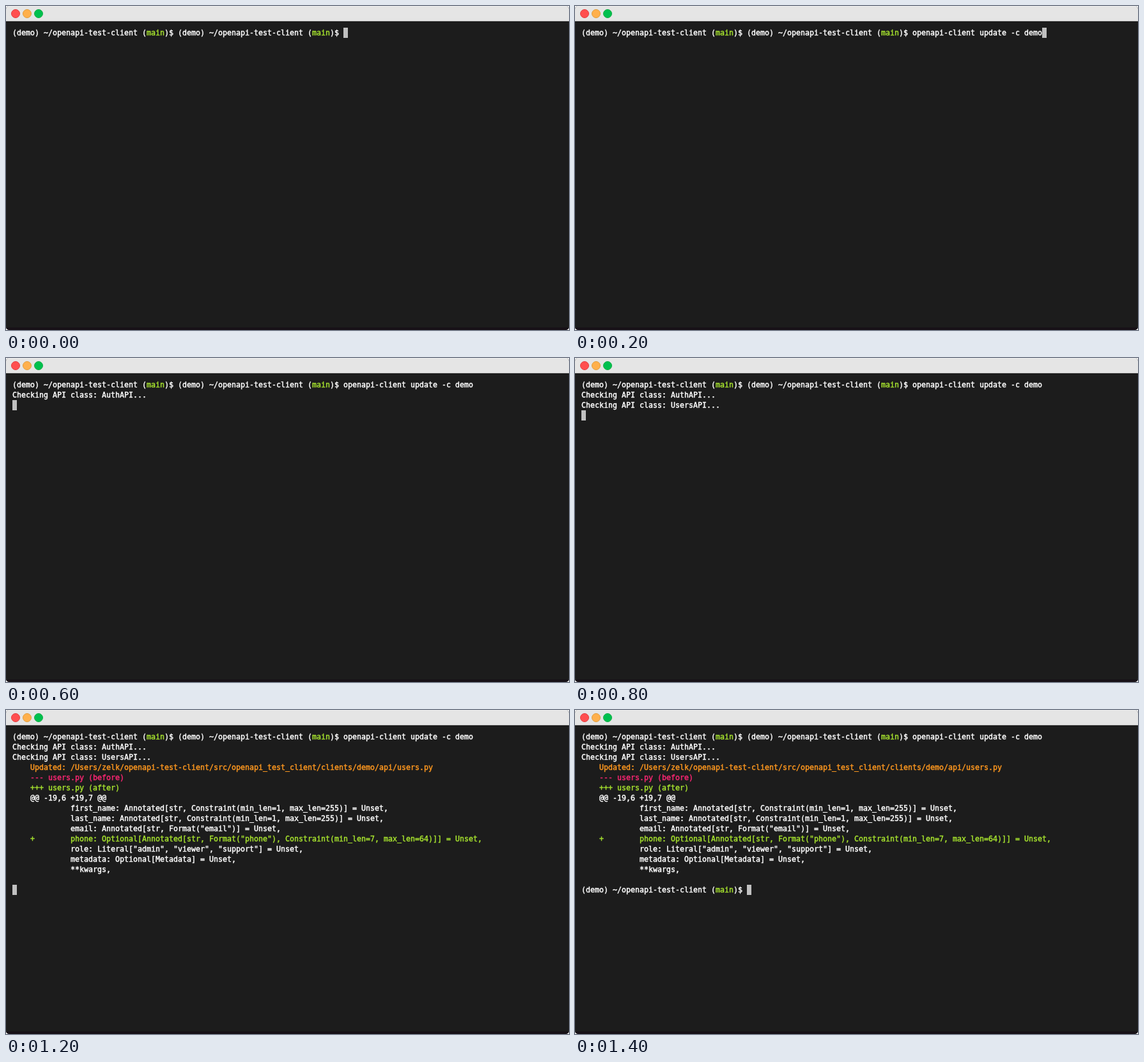
An HTML page with a canvas for the animation above (2000 ms loop, 881 px wide and 508 px high).

```html
<!DOCTYPE html>
<html lang="en">
<head>
<meta charset="utf-8">
<title>Terminal</title>
<style>
  html, body { margin: 0; width: 100%; height: 100%; overflow: hidden; background: #fff; }
  canvas { display: block; }
</style>
</head>
<body>
<canvas id="stage" width="881" height="508"></canvas>
<script>
const ctx = document.getElementById('stage').getContext('2d');
const W = 881, H = 508, LOOP = 2000, STEP = 200;
const LEFT = 10, TOP = 34, COL = 7, ROW = 16;
const WHITE = '#ffffff', GREEN = '#a6e22e', ORANGE = '#fd971f', PINK = '#f92672';

// A line is a list of [text, colour] runs.
const prompt = [['(demo) ~/openapi-test-client (', WHITE], ['main', GREEN], [')$ ', WHITE]];
const line = (text, color = WHITE) => [[text, color]];
const pad = ' '.repeat(4), deep = ' '.repeat(13);

const start = [...prompt, ...prompt];
const lines = [
  [...start, ['openapi-client update -c demo', WHITE]],
  line('Checking API class: AuthAPI...'),
  line('Checking API class: UsersAPI...'),
  line(pad + 'Updated: /Users/zelk/openapi-test-client/src/openapi_test_client/clients/demo/api/users.py', ORANGE),
  line(pad + '--- users.py (before)', PINK),
  line(pad + '+++ users.py (after)', GREEN),
  line(pad + '@@ -19,6 +19,7 @@'),
  line(deep + 'first_name: Annotated[str, Constraint(min_len=1, max_len=255)] = Unset,'),
  line(deep + 'last_name: Annotated[str, Constraint(min_len=1, max_len=255)] = Unset,'),
  line(deep + 'email: Annotated[str, Format("email")] = Unset,'),
  line(pad + '+        phone: Optional[Annotated[str, Format("phone"), Constraint(min_len=7, max_len=64)]] = Unset,', GREEN),
  line(deep + 'role: Literal["admin", "viewer", "support"] = Unset,'),
  line(deep + 'metadata: Optional[Metadata] = Unset,'),
  line(deep + '**kwargs,'),
  line('')
];

// Each screen ends with the line that holds the cursor.
const upTo = n => [...lines.slice(0, n), line('')];
const screens = [
  [start],
  [lines[0]],
  upTo(1),
  upTo(2),
  upTo(3),
  upTo(14),
  upTo(15),
  [...lines, prompt]
];

function drawWindow() {
  ctx.fillStyle = '#fff';
  ctx.fillRect(0, 0, W, H);
  ctx.save();
  ctx.beginPath();
  ctx.roundRect(0, 0, W, H, 5);
  ctx.clip();
  const bar = (y, h, color) => {
    ctx.fillStyle = color;
    ctx.fillRect(0, y, W, h);
  };
  bar(0, H, '#1c1c1c');
  bar(504, 4, '#171117');
  bar(0, 23, '#e5e5e5');
  bar(0, 1, '#efefef');
  bar(23, 1, '#c4c4c4');
  ctx.restore();

  const lights = [['#ff4f4f', '#e33e41'], ['#ffb04c', '#e09e3e'], ['#00c04e', '#14ae46']];
  lights.forEach(([fill, rim], i) => {
    ctx.beginPath();
    ctx.arc(15 + 18 * i, 12, 6.5, 0, Math.PI * 2);
    ctx.fillStyle = fill;
    ctx.fill();
    ctx.lineWidth = 1;
    ctx.strokeStyle = rim;
    ctx.stroke();
  });
}

function drawScreen(rows) {
  ctx.font = '11.63px "DejaVu Sans Mono", "Noto Sans Mono", monospace';
  ctx.textBaseline = 'alphabetic';
  ctx.lineWidth = 0.45;
  ctx.lineJoin = 'round';
  let col = 0;
  rows.forEach((runs, row) => {
    col = 0;
    for (const [text, color] of runs) {
      const lead = text.length - text.trimStart().length;
      const place = [text.trim(), LEFT + (col + lead) * COL, TOP + row * ROW + 12];
      ctx.fillStyle = ctx.strokeStyle = color;
      ctx.fillText(...place);
      ctx.strokeText(...place); // thickens the strokes a little
      col += text.length;
    }
  });
  ctx.fillStyle = '#c0c0c0';
  ctx.fillRect(LEFT + col * COL, TOP + (rows.length - 1) * ROW, COL, ROW);
}

function tick() {
  const t = performance.now() % LOOP;
  drawWindow();
  drawScreen(screens[Math.min(Math.floor(t / STEP), screens.length - 1)]);
  requestAnimationFrame(tick);
}
tick();
</script>
</body>
</html>
```
